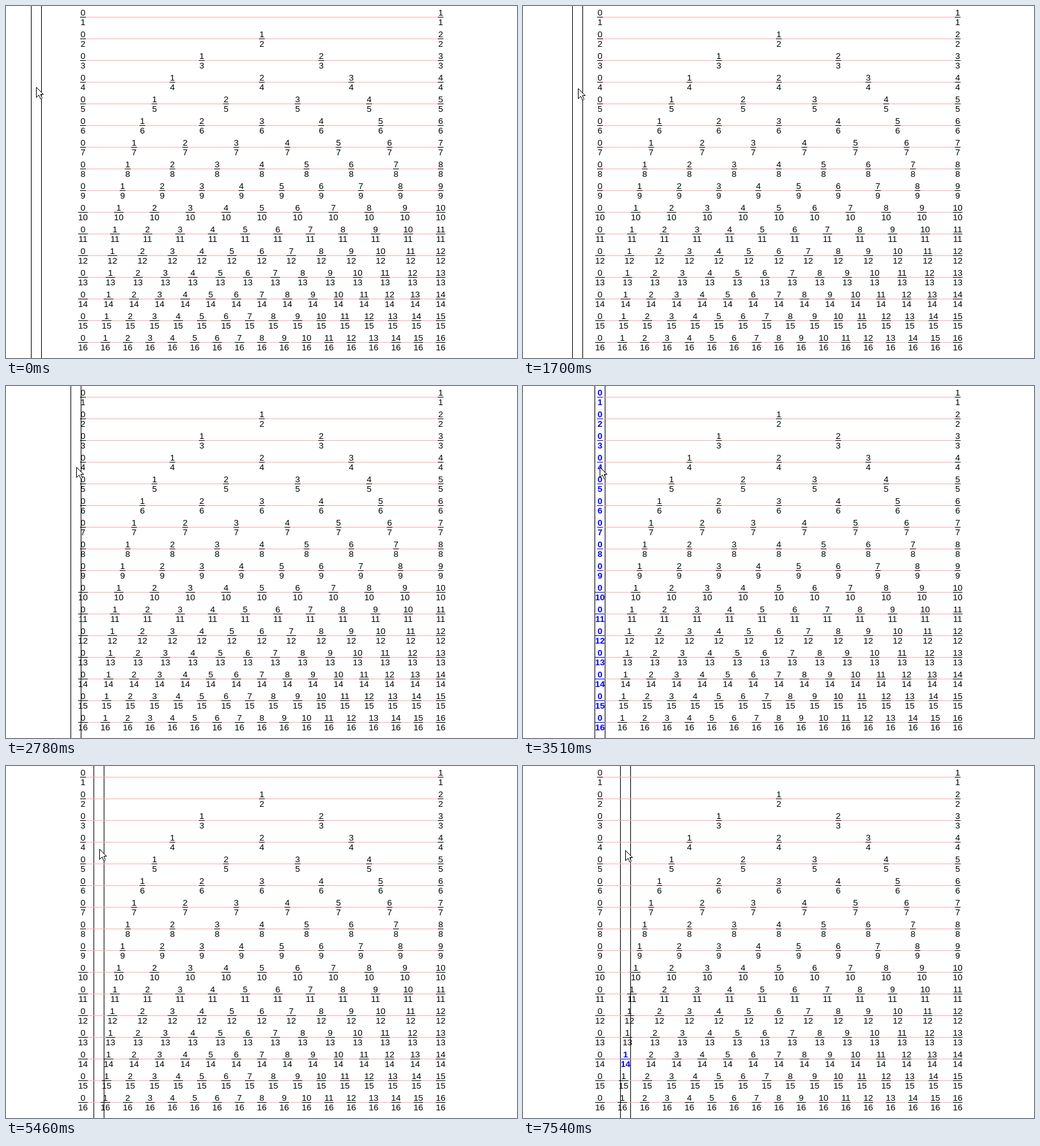
An HTML page with a canvas that plays this animation: 800x552 px, repeating every 8 s.

```html
<!DOCTYPE html>
<html>
<head>
<meta charset="utf-8">
<style>
  html, body { margin: 0; height: 100%; overflow: hidden; background: #fff; }
  canvas { display: block; }
</style>
</head>
<body>
<canvas width="800" height="552"></canvas>
<script>
const ctx = document.querySelector('canvas').getContext('2d');
const LOOP = 8000, LEFT = 120, WIDTH = 560, ROWS = 16, HALF_GAP = 8;
const START = 39, POINTER_LEAD = 40;
// Drags of the line pair: start ms, end ms, new x of the left line
const drags = [
  [660, 1050, 60], [1220, 1700, 77], [1700, 2840, 102], [2840, 3510, 112],
  [4010, 4760, 123], [4760, 5300, 137], [5430, 5820, 142],
  [6020, 6320, 147], [6450, 6600, 149], [7290, 7540, 152],
];
const arrow = new Path2D('M.5 .5V16.5L4.5 12.5L7 18.5H8.5L9.5 17.5L7.2 11.5H11.5Z');

function lineAt(time) {
  let x = START;
  for (const [from, to, target] of drags) {
    if (time < from) break;
    x += (target - x) * Math.min(1, (time - from) / (to - from));
  }
  return Math.round(x);
}

// The hand wavers on the way to the first fractions, then sinks slowly
function pointerY(line) {
  const aligned = LEFT - HALF_GAP;
  const drift = line < aligned
    ? 2 * Math.sin(Math.PI * (line - START) / (aligned - START))
    : (line - aligned) / 8;
  return 127 + Math.floor(drift + 0.01);
}

function fill(color, x, y, w, h) {
  ctx.fillStyle = color;
  ctx.fillRect(x, y, w, h);
}

function drawFraction(num, den, x, y, active) {
  const half = den > 9 ? 7 : 4;
  fill(active ? '#00f' : '#000', x - half, y, 2 * half + 1, 1);
  ctx.font = `${active ? 'bold ' : ''}13.5px "Liberation Sans", Arial, sans-serif`;
  ctx.fillText(num, x + 0.5, y - 2);
  ctx.fillText(den, x + 0.5, y + 13);
}

function drawPointer(x, y) {
  ctx.save();
  ctx.translate(x, y);
  ctx.fillStyle = '#fff';
  ctx.fill(arrow);
  ctx.strokeStyle = '#000';
  ctx.stroke(arrow);
  ctx.restore();
}

function draw(time) {
  const line = lineAt(time);
  fill('#fff', 0, 0, 800, 552);
  fill('#000', line, 0, 1, 552);
  fill('#000', line + 2 * HALF_GAP, 0, 1, 552);

  ctx.textAlign = 'center';
  for (let den = 1; den <= ROWS; den++) {
    const y = 34 * den - 17;
    fill('#ffafaf', LEFT, y, WIDTH, 1);
    for (let num = 0; num <= den; num++) {
      const x = Math.floor(LEFT + WIDTH * num / den);
      drawFraction(num, den, x, y, x === line + HALF_GAP);
    }
  }
  drawPointer(lineAt(time + POINTER_LEAD) + HALF_GAP, pointerY(line));
}

function tick() {
  draw(performance.now() % LOOP);
  requestAnimationFrame(tick);
}
tick();
</script>
</body>
</html>
```
